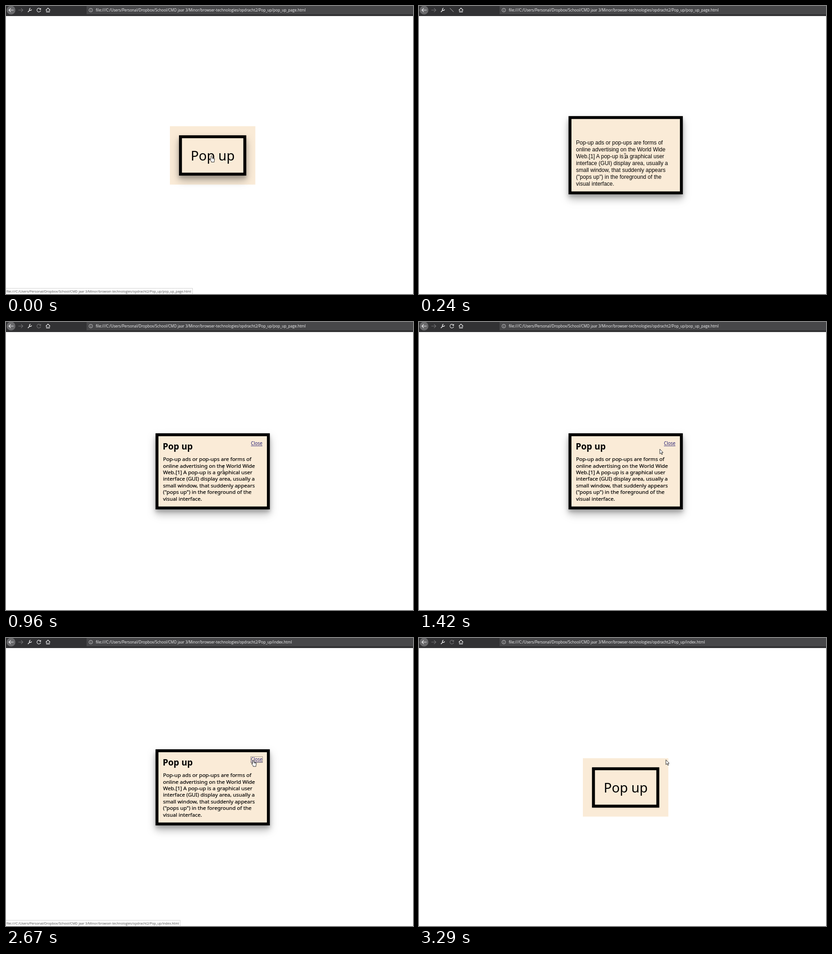
Recreate the animation shown at these times as an HTML page. Size 889 by 630 pixels, loop 3370 ms.

```html
<!DOCTYPE html>
<html lang="nl">
<head>
<meta charset="utf-8">
<title>Pop up</title>
<style>
  html, body { margin: 0; width: 100%; height: 100%; overflow: hidden; background: #fff; }
  svg { position: absolute; left: 0; top: 0; }
  .framed { fill: #faebd7; stroke: #000; stroke-width: 6.4; filter: drop-shadow(0 1px 1px rgba(0,0,0,.2)); }
  .framed.raised { filter: drop-shadow(0 9px 9px rgba(0,0,0,.25)) drop-shadow(0 6px 3.5px rgba(0,0,0,.2)); }
  .ui { font-family: "Open Sans", sans-serif; }
  .page { font-family: "Noto Sans", sans-serif; }
  .icon { fill: none; stroke: #f4f4f5; stroke-width: 1.1; }
  .cursor { fill: #fff; stroke: #111; stroke-width: .9; stroke-linejoin: round; }
</style>
</head>
<body>
<svg width="889" height="630" viewBox="0 0 889 630">
  <rect id="panel" fill="#faebd7"/>
  <rect id="button" class="framed"/>
  <rect id="popup" class="framed raised"/>

  <rect width="889" height="22" fill="#323234"/>
  <rect x="176" width="713" height="18" fill="#474749"/>
  <circle cx="11" cy="9" r="9.6" fill="#69696b"/>
  <g class="icon">
    <path d="M16.5 9H6.5M10.5 4.8L6.3 9L10.5 13.2"/>
    <path d="M27 9H37M32.8 4.8L37 9L32.8 13.2" stroke="#747476"/>
    <path d="M47.8 13.2L52.8 8.2" stroke-width="1.5"/>
    <path d="M55.8 7.2A2.4 2.4 0 1 1 53.6 4.9" stroke-width="1.3"/>
    <g id="reload">
      <path id="arc" d="M74.8 6.3A4.1 4.1 0 1 0 75.7 9.8" pathLength="1"/>
      <path id="head" d="M76.3 4.2V8H72.5Z" fill="#f4f4f5" stroke="none"/>
    </g>
    <path id="slash" d="M67.5 4.8L75.5 12.8"/>
    <path id="backslash" d="M75.5 4.8L67.5 12.8"/>
    <path d="M87 9L91.7 4.4L96.4 9M88.4 8.5V13.2H95V8.5M91.7 13V10"/>
    <g stroke="#d0d0d2" stroke-width=".9"><circle cx="185.2" cy="9" r="4"/><path d="M185.2 8.4V11.4M185.2 6.4V7.4"/></g>
  </g>
  <text id="url" class="ui" x="196" y="12.3" font-size="8.18" fill="#f9f9fa"/>

  <text id="buttonText" class="page" x="451.5" y="338" font-size="29" text-anchor="middle">Pop up</text>
  <g id="webText" class="page">
    <text x="342.3" y="278.6" font-size="19.1" font-weight="700">Pop up</text>
    <text id="close" x="535" y="269.4" font-size="9.85">Close</text>
    <path id="underline" d="M535 271H560" stroke-width=".9"/>
    <rect id="focus" x="534.5" y="259.5" width="26" height="13" fill="none" stroke="#222" stroke-width=".8" stroke-dasharray="1 1"/>
  </g>
  <g id="webBody" class="page" font-size="11.54" stroke="#000" stroke-width=".2"></g>
  <g id="plainBody" font-family="Liberation Sans, sans-serif" font-size="12"></g>

  <g id="status">
    <rect id="statusBox" x="-1" y="617.5" height="14" fill="#fdfdfd" stroke="#d4d4d4"/>
    <text id="statusText" class="ui" x="1" y="627.3" font-size="7.2" fill="#4c4c4c"/>
  </g>

  <path id="arrow" class="cursor" d="M0 0V10.5L2.5 8.2L4.2 12L5.8 11.3L4.2 7.6H7.2Z"/>
  <path id="hand" class="cursor" d="M-1.2 9V1.2Q0-.6 1.2 1.2V5.2L5.8 6.2Q7 6.6 6.8 8L6 12V14.5H-.2V12.8L-3.6 8.8Q-3.8 7-2.2 7.4ZM3 6V8M5 6.4V8.2"/>
  <path id="beam" d="M-2.2-5.5H-.5L0-5L.5-5.5H2.2M0-5V5M-2.2 5.5H-.5L0 5L.5 5.5H2.2" fill="none" stroke="#333" stroke-width=".9"/>
</svg>
<script>
const LOOP = 3370, BORDER = 6.4;
const FOLDER = 'file:///C:/Users/Personal/Dropbox/School/CMD jaar 3/Minor/browser-technologies/opdracht2/Pop_up/';
const POPUP_URL = FOLDER + 'pop_up_page.html', INDEX_URL = FOLDER + 'index.html';
const LINES = [
  'Pop-up ads or pop-ups are forms of', 'online advertising on the World Wide',
  'Web.[1] A pop-up is a graphical user', 'interface (GUI) display area, usually a',
  'small window, that suddenly appears', '("pops up") in the foreground of the', 'visual interface.'
];
// time, x, y of the pointer's hot spot
const PATH = [[470, 450, 328], [960, 475, 320], [1420, 526, 278], [1490, 531.5, 273.5], [1880, 540, 266.5]];

const el = id => document.getElementById(id);
const show = (id, on) => { el(id).style.display = on ? '' : 'none'; };
const setText = (id, text) => { if (el(id).textContent !== text) el(id).textContent = text; };

// Places a rectangle by its outer edges, keeping any border inside.
function place(id, left, top, right, bottom, border = 0) {
  const box = { x: left + border / 2, y: top + border / 2, width: right - left - border, height: bottom - top - border };
  for (const name in box) el(id).setAttribute(name, box[name]);
}

function addLines(id, top, spacing) {
  LINES.forEach((line, i) => {
    const text = document.createElementNS('http://www.w3.org/2000/svg', 'text');
    text.setAttribute('x', 343);
    text.setAttribute('y', top + i * spacing);
    text.textContent = line;
    el(id).append(text);
  });
}
addLines('webBody', 304.3, 14.37);
addLines('plainBody', 303, 15);

function pointerAt(t) {
  if (t < 90) return [448.8, 327];
  if (t < 470) return [450, 328];
  if (t >= 2740) return [539.3, 266.5];
  const time = 470 + Math.floor((t - 470) / 78) * 78 + 14;
  const next = PATH.findIndex(p => p[0] > time);
  if (next < 0) return PATH[PATH.length - 1].slice(1);
  const [t0, x0, y0] = PATH[next - 1], [t1, x1, y1] = PATH[next];
  const k = (time - t0) / (t1 - t0);
  return [x0 + (x1 - x0) * k, y0 + (y1 - y0) * k];
}

function drawReload(t) {
  const step = Math.floor((t - (t < 2740 ? 90 : 2740)) / 76);
  const stopping = step >= 1 && step <= 4;
  const length = { 0: .25, 5: .4, 6: .75 }[step] || 1;
  show('reload', !stopping);
  show('slash', stopping);
  show('backslash', step === 3 || step === 4);
  show('head', length === 1);
  el('arc').setAttribute('stroke-dasharray', `${length} 2`);
  el('reload').setAttribute('opacity', step >= 0 && step < 13 ? .35 : 1);
  el('slash').setAttribute('stroke-width', step < 3 ? .8 : 1.1);
}

function drawPopup(t, open) {
  const loaded = t >= 320;
  show('popup', open);
  place('popup', 326.6, loaded ? 243.4 : 240.8, 576.3, loaded ? 410 : 412, BORDER);
  show('webText', open && loaded);
  show('webBody', open && loaded);
  show('plainBody', open && !loaded);
  const color = t >= 2430 && t < 2500 ? '#ee0000' : '#211a70';
  el('close').setAttribute('fill', color);
  el('underline').setAttribute('stroke', color);
  show('focus', t >= 2430);
}

function drawButton(t, visible) {
  const loading = t >= 2740 && t < 2900, grow = loading ? .5 : 0;
  show('panel', visible);
  show('button', visible);
  show('buttonText', visible && !loading);
  el('button').classList.toggle('raised', t < 90);
  place('panel', 358 - grow, 263, 544.6 + grow, 390.7);
  place('button', 377.9 - grow, 282.8, 524.8 + grow, 371, BORDER);
}

function drawStatus(t, overLink) {
  const fading = t >= 90 && t < 170 || t >= 2740 && t < 2820;
  const first = t < 1000;
  show('status', overLink || fading);
  setText('statusText', first ? POPUP_URL : INDEX_URL);
  el('statusBox').setAttribute('width', first ? 408.5 : 381.5);
  el('status').setAttribute('opacity', fading ? .25 : 1);
}

function draw(t) {
  const open = t >= 90 && t < 2740;
  const [x, y] = pointerAt(t);
  const overLink = t < 90 || open && x > 535.5;
  const overText = open && y > 292;
  const cursor = overLink ? 'hand' : overText ? 'beam' : 'arrow';

  setText('url', t < 2670 ? POPUP_URL : INDEX_URL);
  drawReload(t);
  drawPopup(t, open);
  drawButton(t, !open);
  drawStatus(t, overLink);
  ['arrow', 'hand', 'beam'].forEach(id => show(id, id === cursor));
  el(cursor).setAttribute('transform', `translate(${x} ${y})`);
}

const start = performance.now();
function tick() {
  draw((performance.now() - start) % LOOP);
  requestAnimationFrame(tick);
}
tick();
</script>
</body>
</html>
```
